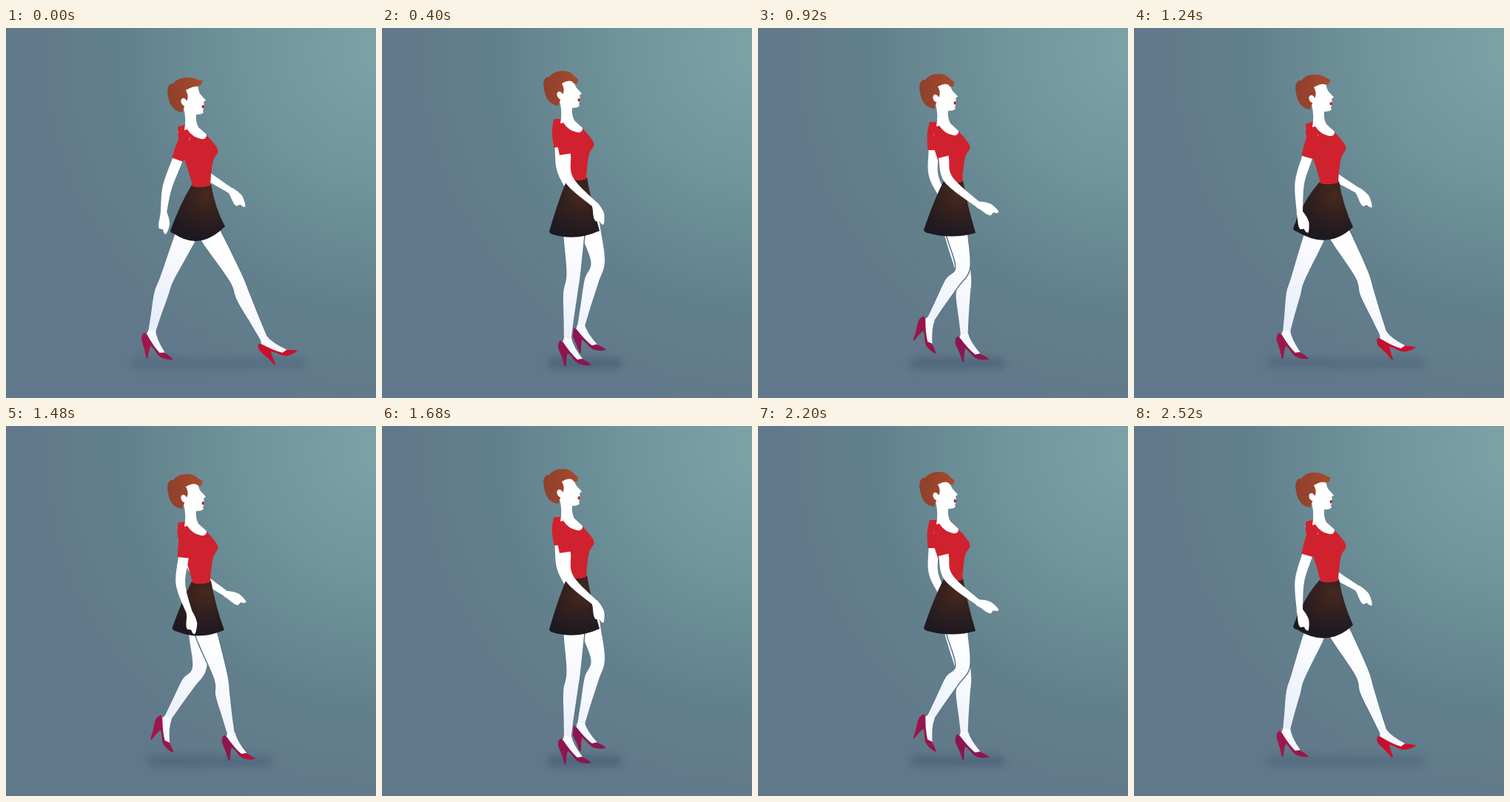
Recreate the animation shown at these times as an HTML page with a canvas. Size 500 by 500 pixels, loop 2.56 s.

```html
<!DOCTYPE html>
<html lang="en">
<head>
<meta charset="utf-8">
<title>Walk cycle</title>
<style>
  html, body { margin: 0; width: 100%; height: 100%; overflow: hidden; }
  canvas { display: block; }
</style>
</head>
<body>
<canvas id="stage" width="500" height="500"></canvas>
<script>
const ctx = document.getElementById('stage').getContext('2d');
const CYCLE = 1280, STEP = 40;

// Poses over one stride: phase, then values. Phase 0 is the heel strike.
// Leg: hip x, knee x, y, ankle x, y, foot angle
const LEG = [
  [0, 259, 311, 338, 350, 422, -28],
  [.0625, 260, 306, 340, 342, 421, -2],
  [.219, 260, 279, 338, 279, 416, -3],
  [.3125, 260, 259, 332, 251, 422, 0],
  [.469, 258, 222, 338, 206, 412, 3],
  [.5, 257, 218, 338, 197, 412, 5],
  [.6, 260, 246, 331, 208, 400, 25],
  [.719, 264, 277, 324, 233, 395, 34],
  [.8125, 274, 292, 316, 269, 404, -4],
  [.969, 260, 308, 333, 338, 415, -25]
];
// Arm, relative to the torso: elbow x, y, wrist x, y, hand angle
const ARM = [
  [0, 218, 216, 213, 250, 82],
  [.219, 244, 216, 264, 256, 70],
  [.3125, 253, 214, 288, 248, 65],
  [.469, 264, 204, 309, 234, 48],
  [.5, 266, 200, 310, 230, 46],
  [.719, 258, 210, 298, 244, 17],
  [.8125, 250, 214, 272, 256, 60],
  [.969, 224, 214, 224, 254, 65]
];
// Body, twice per stride: lift, fringe drop, hem left x, y, right x, y, hem bottom
const BODY = [
  [0, 0, 0, 222, 274, 296, 268, 287],
  [.16, 1, 3, 225, 274, 296, 273, 286],
  [.438, -5, 8, 224, 273, 294, 277, 281],
  [.625, -9, 8, 226, 275, 294, 274, 282],
  [.78, -12, 6, 221, 272, 295, 271, 283],
  [.938, -4, 3, 215, 271, 296, 269, 286]
];

// Periodic cubic interpolation of a pose table
function pose(keys, phase) {
  const n = keys.length, u = phase % 1;
  const key = (i, c) => {
    const k = ((i % n) + n) % n;
    return keys[k][c] + (c ? 0 : Math.floor(i / n));
  };
  let i = n - 1;
  while (keys[i][0] > u) i--;
  const span = key(i + 1, 0) - key(i, 0), s = (u - key(i, 0)) / span;
  const slope = (j, c) => (key(j + 1, c) - key(j - 1, c)) / (key(j + 1, 0) - key(j - 1, 0)) * span;
  return keys[0].slice(1).map((_, k) => {
    const c = k + 1, a = key(i, c), b = key(i + 1, c);
    return a + (b - a) * s * s * (3 - 2 * s)
      + slope(i, c) * s * (1 - s) ** 2 - slope(i + 1, c) * s * s * (1 - s);
  });
}

function gradient(g, stops) {
  stops.forEach(([at, color]) => g.addColorStop(at, color));
  return g;
}
const linear = (x0, y0, x1, y1, ...stops) => gradient(ctx.createLinearGradient(x0, y0, x1, y1), stops);
const radial = (x, y, r, ...stops) => gradient(ctx.createRadialGradient(x, y, 0, x, y, r), stops);

const WALL = radial(505, 30, 500, [0, '#7da3a7'], [.35, '#70959c'], [.7, '#62808c'], [1, '#61788a']);
const SKIN = linear(220, 410, 306, 312, [0, '#e8eef9'], [1, '#fff']);
const SHOE = linear(185, 0, 350, 0, [0, '#a0174a'], [.25, '#971648'], [.4, '#8c1552'], [.7, '#8e1550'], [.95, '#c9102c']);
const SHIRT = '#d0222e';
const HAIR = linear(220, 0, 268, 0, [0, '#8f402d'], [1, '#a94b2c']);
const SKIRT = radial(270, 226, 58, [0, '#48291f'], [.4, '#35211f'], [1, '#1d1920']);

const shape = (d, color) => { ctx.fillStyle = color; ctx.fill(new Path2D(d)); };
const lerp = (a, b, t) => [a[0] + (b[0] - a[0]) * t, a[1] + (b[1] - a[1]) * t];

function curve(points) {
  const at = i => points[Math.max(0, Math.min(points.length - 1, i))];
  ctx.lineTo(...points[0]);
  for (let i = 0; i < points.length - 1; i++) {
    const [p, a, b, q] = [at(i - 1), at(i), at(i + 1), at(i + 2)];
    ctx.bezierCurveTo(a[0] + (b[0] - p[0]) / 6, a[1] + (b[1] - p[1]) / 6,
      b[0] - (q[0] - a[0]) / 6, b[1] - (q[1] - a[1]) / 6, ...b);
  }
}

// Limb along a spine of [point, back width, front width]
function limb(spine, color, outline) {
  const edge = side => spine.map(([p, ...w], i) => {
    const a = spine[Math.max(0, i - 1)][0], b = spine[Math.min(spine.length - 1, i + 1)][0];
    const dx = b[0] - a[0], dy = b[1] - a[1], k = (side ? -1 : 1) * w[side] / Math.hypot(dx, dy);
    return [p[0] - dy * k, p[1] + dx * k];
  });
  ctx.beginPath();
  curve(edge(0));
  curve(edge(1).reverse());
  ctx.closePath();
  if (outline) { ctx.strokeStyle = '#60798a'; ctx.lineWidth = 3; ctx.stroke(); }
  ctx.fillStyle = color;
  ctx.fill();
}

function placed(x, y, degrees, draw) {
  ctx.save();
  ctx.translate(x, y);
  ctx.rotate(degrees * Math.PI / 180);
  draw();
  ctx.restore();
}

function shoeColor(x, y, degrees) {
  // keeps the stage-wide gradient while the shoe turns
  const m = new DOMMatrix().translate(x, y).rotate(degrees);
  const fill = new Path2D();
  fill.addPath(new Path2D('M-10 0Q-15 5-12 13Q-7 24-4.5 35H-2.5Q-2 24 0 17Q5 21 9 27Q13 32 19 33Q27 35 32 33Q26 28 19 25L13 26Q4 18-6 3Z'), m);
  ctx.fillStyle = SHOE;
  ctx.fill(fill);
}

function leg([hx, kx, ky, ax, ay, turn], lift, outline) {
  const hip = [hx, 250 + lift], knee = [kx, ky], ankle = [ax, ay];
  limb([[hip, 16, 16], [lerp(hip, knee, .45), 14, 13.5], [knee, 9.5, 9], [lerp(knee, ankle, .3), 11.5, 7.5],
    [lerp(knee, ankle, .68), 8, 5.5], [ankle, 5, 4.5]], SKIN, outline);
  placed(ax, ay, turn, () => shape('M-5-3L5-3Q7 8 20 25L13 28Q2 20-7 3Z', '#f6f8fd'));
  shoeColor(ax, ay, turn);
}

function arm([ex, ey, wx, wy, turn]) {
  const shoulder = [243, 147], elbow = [ex, ey], wrist = [wx, wy];
  const cuff = lerp(shoulder, elbow, 33 / Math.hypot(ex - 243, ey - 147));
  limb([[shoulder, 6, 6], [cuff, 7, 7], [elbow, 6.5, 6], [wrist, 4, 4]], '#fff');
  placed(wx, wy, turn, () => shape('M-2-4Q8-7 16-6Q25-3 29 1Q28 4 22 4L20 9Q16 10 11 8Q4 5-2 4Z', '#fff'));
  limb([[[243, 142], 5, 5], [lerp(shoulder, cuff, .35), 8.5, 8], [cuff, 8, 8]], SHIRT);
}

function head(drop) {
  shape('M240 82L259 77Q260 86 263 90L270 97.500L267 100L268 104L266 106L267.500 109Q265 111 267 114Q265 117 257 117Q256 127 260 134L271 144Q271 151 264 150Q252 148 245 137L241 138Q244 122 240 108Z', '#fff');
  shape('M264.500 105L268 103.500L267 106L268 108L265 108.500Z', '#c4142f');
  const y = 71 + drop;
  shape(`M219 92Q217 82 220 78Q221 75 226 75Q233 66 246 67Q254 67 260 ${70 + drop * .5}L266 ${y}L264 ${y + 3}L265 ${y + 4}Q261 ${y + 8} 257 ${79 + drop * .3}Q252 79 243 84Q247 91 245 97Q243 100 241 106L238 114Q222 112 219 92Z`, HAIR);
  ctx.fillStyle = '#fff';
  ctx.beginPath();
  ctx.ellipse(240.5, 100, 3.8, 5.5, -.4, 0, 7);
  ctx.fill();
}

function shadow(a, b) {
  const left = Math.min(a, b) - 27, width = Math.abs(a - b) + 82;
  ctx.save();
  ctx.filter = 'blur(5px)';
  ctx.globalAlpha = .68 - width / 600;
  ctx.fillStyle = '#40566e';
  ctx.beginPath();
  ctx.roundRect(left, 445, width, 16, 8);
  ctx.fill();
  ctx.restore();
}

function draw(time) {
  const phase = Math.floor(time / STEP) * STEP % CYCLE / CYCLE;
  const [lift, drop, lx, ly, rx, ry, bottom] = pose(BODY, phase * 2);
  const near = pose(LEG, phase), far = pose(LEG, phase + .5);
  const onTorso = (x, y, part) => placed(x, y + lift, 0, part);

  ctx.fillStyle = WALL;
  ctx.fillRect(0, 0, 500, 500);
  shadow(near[3], far[3]);
  onTorso(-6, -10, () => arm(pose(ARM, phase + .5)));
  leg(far, lift);
  leg(near, lift, true);

  const waist = 212 + lift;
  shape(`M251 ${waist}Q${lx + 14} ${waist + 24} ${lx} ${ly}Q${lx + 1} ${ly + 3} ${lx + 5} ${ly + 4}Q262 ${2 * bottom - (ly + ry) / 2 - 1} ${rx} ${ry}Q283 ${waist + 33} 277 ${waist - 1}Z`, SKIRT);

  onTorso(0, 0, () => {
    shape('M246 136Q236 137 234 148L237 165L243 183Q249 200 252 214Q264 217 276 213Q277 195 279 184Q280 177 284 172Q289 167 284 160Q278 151 269 143Z', SHIRT);
    head(drop);
    arm(pose(ARM, phase));
  });
}

function tick(now) {
  draw(now);
  requestAnimationFrame(tick);
}
draw(0);
requestAnimationFrame(tick);
</script>
</body>
</html>
```
